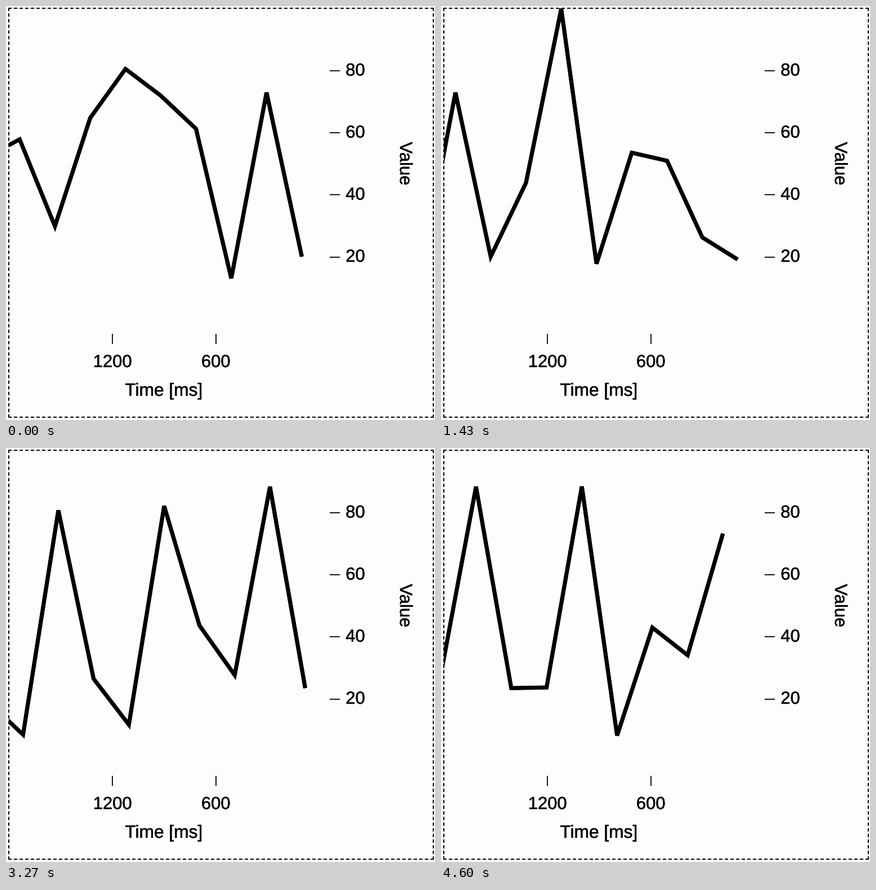
Write a matplotlib script that moves like this. It is 762 px wide and 735 px high and loops after 4630 ms.

```python
import matplotlib.pyplot as plt
import numpy as np
from matplotlib.animation import FuncAnimation
from matplotlib.patches import Rectangle
from matplotlib.patheffects import withStroke

W, H = 762, 735
LOOP_MS, TICK_MS = 4630, 10
STEP_MS = 100 / 3          # the picture advances 30 times a second
SPEED = 0.305              # scroll in px per ms
START, SPACING = -38.4, 62.65
PAPER, INK = "#fdfdfd", "black"
LEFT, TOP, RIGHT, BOTTOM = 5, 4, 557, 556

plt.rcParams["font.family"] = "Liberation Sans"
plt.rcParams["path.simplify"] = False

# The charted readings, evenly spaced in time.
READINGS = [
    51.9, 57.9, 29.9, 64.8, 80.6, 72, 61.3, 13.1, 73, 20.1, 43.9,
    100, 17.8, 53.6, 51, 26.3, 19.2, 8.5, 80.8, 26.5, 11.7,
    82.2, 43.7, 27.7, 88.4, 23.5, 23.7, 88.5, 8.2, 43, 34.1, 73.3]

# At 72 dpi one point equals one pixel.
fig = plt.figure(figsize=(W / 72, H / 72), dpi=72, facecolor=PAPER)
ax = fig.add_axes([0, 0, 1, 1])
ax.set_xlim(0, W)
ax.set_ylim(H, 0)
ax.axis("off")


def value_y(value):
    return 555.7 - 5.508 * value


def stroke(x, y, width, **style):
    style.setdefault("solid_capstyle", "butt")
    return ax.plot(x, y, color=INK, lw=width, **style)[0]


def label(text, x, y, size=31, **style):
    ax.text(x, y, text, size=size, color=INK, ha="center", va="baseline",
            path_effects=[withStroke(linewidth=0.45, foreground=INK)], **style)


def dashed(x, y, length):
    count = (length + 4) // 10
    gap = (length - 6 * count) / (count - 1)
    stroke(x, y, 2, ls=(0, (3, gap / 2)), dash_capstyle="butt")


def draw_border():
    for y in (4, 730):
        dashed([4, 760], [y, y], 756)
    for x in (5, 759):
        dashed([x, x], [3, 731], 728)


def draw_axes():
    for value in (20, 40, 60, 80):
        y = value_y(value)
        stroke([575, 593], [y, y], 1.8)
        label(str(value), 620.5, y + 8.5)
    for ms in (600, 1200):
        x = 556.3 - 0.306 * ms
        stroke([x, x], [582, 600], 1.8)
        label(str(ms), x, 641)
    label("Time [ms]", 280.5, 692, size=31.7)
    label("Value", 700, 280, rotation=270, rotation_mode="anchor")


def split_sharp_corners(points):
    """Break the line where a mitre would be over four line widths long."""
    steps = np.diff(points, axis=0)
    steps /= np.hypot(*steps.T)[:, None]
    sharp = -np.sum(steps[:-1] * steps[1:], axis=1) > 0.875
    parts = [points[0]]
    for point, is_sharp in zip(points[1:-1], sharp):
        parts += [point, (np.nan, np.nan), point] if is_sharp else [point]
    return np.array(parts + [points[-1]])


def series_curve(points, join, width):
    curve = stroke([], [], width, solid_joinstyle=join)
    curve.set_clip_path(Rectangle((LEFT, TOP), RIGHT - LEFT, BOTTOM - TOP,
                                  transform=ax.transData))
    return curve, points


draw_border()
draw_axes()
series = np.array([(START + SPACING * i, value_y(v))
                   for i, v in enumerate(READINGS)])
# Wide corners get mitred tips, sharp ones stay cut flat.
curves = [series_curve(series, "bevel", 6.6),
          series_curve(split_sharp_corners(series), "miter", 7.2)]


def update(frame):
    step = int((frame + 0.5) * TICK_MS / STEP_MS)
    scroll = SPEED * STEP_MS * step
    for curve, points in curves:
        x, y = points[:, 0] - scroll, points[:, 1]
        arrived = ~(x > RIGHT)
        curve.set_data(x[arrived], y[arrived])
    return [curve for curve, _ in curves]


anim = FuncAnimation(fig, update, frames=LOOP_MS // TICK_MS, interval=TICK_MS,
                     repeat=True, repeat_delay=0)
plt.show()
```
